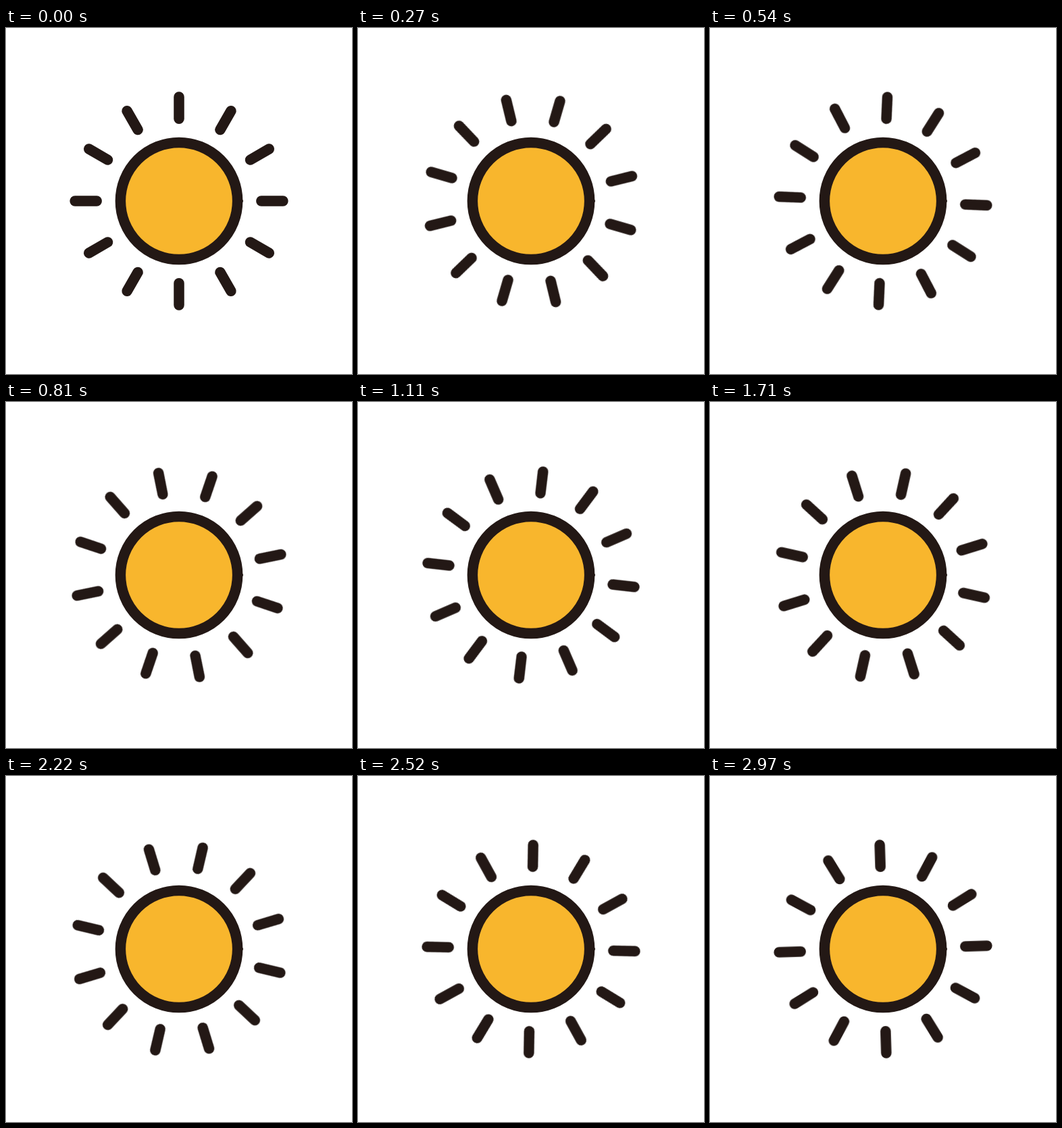
Write an HTML page that moves like this. It is 512 by 512 pixels and loops after 3 s.

```html
<!DOCTYPE html>
<html lang="en">
<head>
<meta charset="utf-8">
<title>Sun</title>
<style>
  html, body { margin: 0; width: 100%; height: 100%; overflow: hidden; background: #fff; }
  svg { display: block; width: 100vw; height: 100vh; }
  #rays, .disc { stroke: #231815; stroke-width: 15.5; stroke-linecap: round; }
  #rays { transform-origin: 0 0; }
  .disc { fill: #f8b62d; }
  .seam { fill: #231815; }
</style>
</head>
<body>
<svg viewBox="-256 -256 512 512">
  <g id="rays"></g>
  <circle class="disc" r="86.6"/>
  <circle class="seam" cx="92.8" r="2.2"/>
</svg>
<script>
  const RAYS = 12, LOOP = 3000, STEP = 30;
  const rays = document.getElementById('rays');

  for (let i = 0; i < RAYS; i++) {
    const ray = document.createElementNS('http://www.w3.org/2000/svg', 'line');
    ray.setAttribute('y1', -121.8);
    ray.setAttribute('y2', -153.9);
    ray.setAttribute('transform', `rotate(${i * 360 / RAYS})`);
    rays.append(ray);
  }

  // Half a turn per loop is seamless, since the rays repeat every 30 degrees.
  rays.animate(
    { transform: ['rotate(0deg)', 'rotate(180deg)'] },
    { duration: LOOP, iterations: Infinity, easing: `steps(${LOOP / STEP}, end)` }
  );
</script>
</body>
</html>
```
